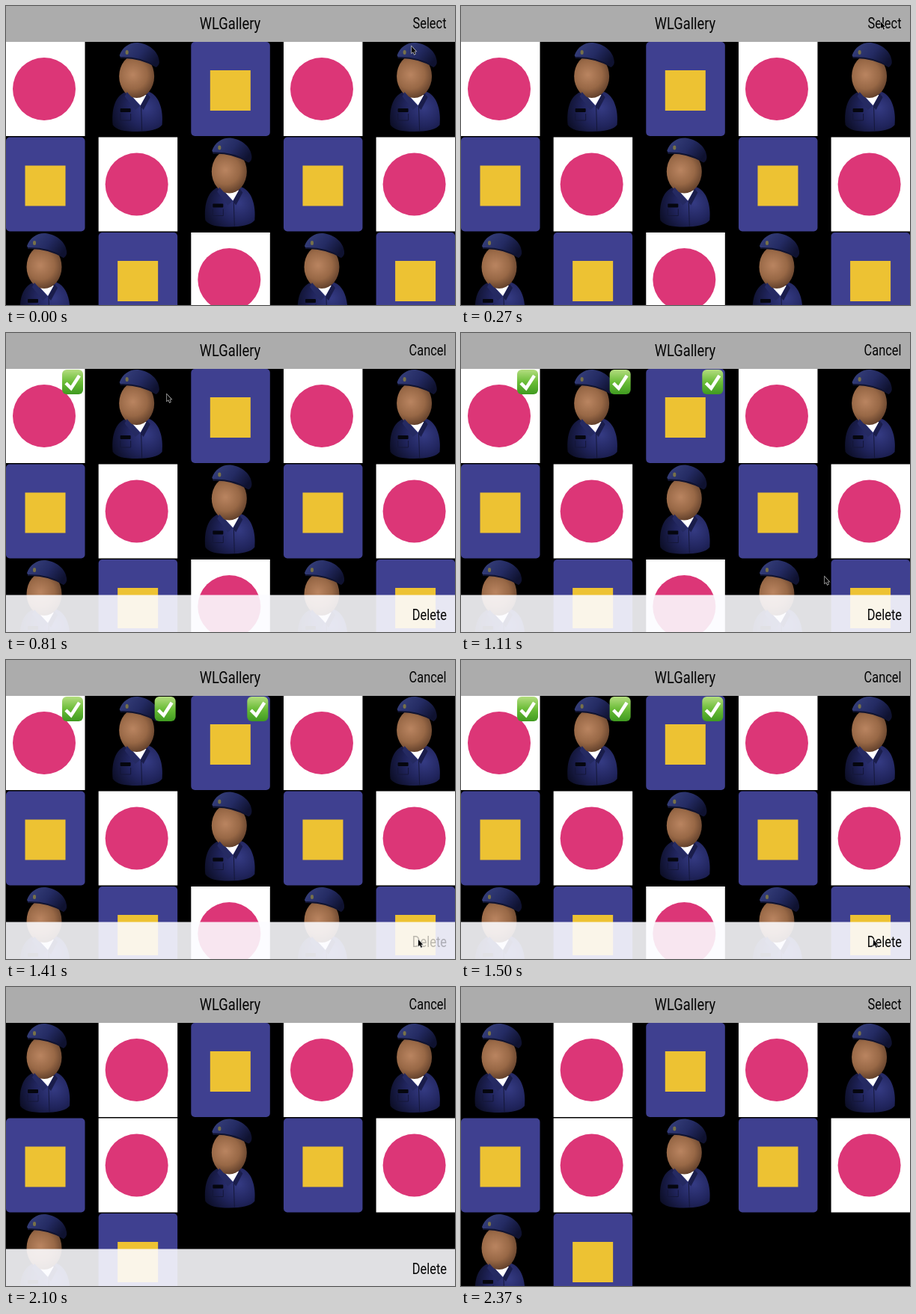
Recreate the animation shown at these times as an HTML page with a canvas. Size 600x400 px, loop 2.4 s.

```html
<!DOCTYPE html>
<html lang="en">
<head>
<meta charset="utf-8">
<title>Gallery</title>
<style>
html, body { margin: 0; width: 100%; height: 100%; overflow: hidden; background: #000; }
canvas { display: block; width: 600px; height: 400px; }
</style>
</head>
<body>
<canvas id="stage" width="600" height="400"></canvas>
<script>
const ctx = document.getElementById('stage').getContext('2d');
const LOOP = 2400, TILE_W = 105.5, TILE_H = 126, COLS = 5;
// The screen has tall pixels: its square tiles appear higher than wide.
const PIXEL_ASPECT = TILE_H / TILE_W;
const KINDS = ['wave', 'officer', 'honey'];

const clamp = v => Math.min(1, Math.max(0, v));
const ease = v => v * v * (3 - 2 * v);
const ramp = (t, from, to) => ease(clamp((t - from) / (to - from)));
const mix = (a, b, p) => a + (b - a) * p;

// time, x, y of the pointer tip
const pointerPath = [
  [0, 542, 54], [210, 561, 21], [450, 561, 21], [660, 85, 96], [720, 85, 96],
  [810, 215, 82], [870, 205, 95], [960, 302, 96], [1000, 302, 96],
  [1110, 486, 326], [1290, 551, 374], [1680, 551, 374]
];

const checkTimes = [690, 870, 980];

function slot(i) {
  return [(i % COLS) * 123.65, 48 + Math.floor(i / COLS) * 127.5];
}

function fillPath(path, color) {
  ctx.fillStyle = color;
  ctx.fill(path instanceof Path2D ? path : new Path2D(path));
}

function box(x, y, w, h, r, color) {
  ctx.beginPath();
  ctx.roundRect(x, y, w, h, r);
  ctx.fillStyle = color;
  ctx.fill();
}

function linear(x0, y0, x1, y1, ...colors) {
  const g = ctx.createLinearGradient(x0, y0, x1, y1);
  colors.forEach((c, i) => g.addColorStop(i / (colors.length - 1), c));
  return g;
}

function radial(x, y, r, ...colors) {
  const g = ctx.createRadialGradient(x, y, 1, x, y, r);
  colors.forEach((c, i) => g.addColorStop(i / (colors.length - 1), c));
  return g;
}

const draw = {
  wave() {
    box(0, 0, TILE_W, TILE_H, 0, '#fff');
    ctx.beginPath();
    ctx.arc(51, 63, 42, 0, Math.PI * 2);
    ctx.fillStyle = '#dc3677';
    ctx.fill();
  },

  honey() {
    box(0, 0, TILE_W, TILE_H, 5, '#3f4090');
    box(25.5, 38, 54, 54, 0, '#edc233');
  },

  officer() {
    fillPath('M19 111C17 88 23 72 36 67Q51 61 68 67C81 72 87 91 85 111C81 117 68 120 51 120S24 118 19 111Z',
      radial(64, 88, 50, '#343a82', '#20245c', '#0c0e26'));
    fillPath('M43 71L64 71L56 85Z', '#fff');
    const head = new Path2D();
    head.ellipse(51, 46, 23.5, 29, 0, 0, Math.PI * 2);
    fillPath(head, radial(46, 44, 37, '#b8835f', '#986846', '#4c3020'));
    fillPath('M38 67L55 86L49 91L35 73Z', '#252a62');
    fillPath('M65 69L56 86L60 91L69 74Z', '#1a1d4b');
    fillPath('M28 18C32 6 43 0 53 1C69 3 80 14 81 25Q82 31 77 34C64 25 46 21 30 22Z',
      linear(35, 4, 72, 32, '#343d78', '#242b63', '#0f1230'));
    ctx.strokeStyle = '#101330';
    ctx.lineWidth = 2;
    ctx.stroke(new Path2D('M29 21Q55 20 77 33'));
    box(36, 11, 4, 6, 2, '#77714a');
    box(29, 89, 14, 5, 1, '#05060e');
    ctx.strokeStyle = '#141739';
    ctx.lineWidth = 1;
    ctx.stroke(new Path2D('M57 87L58 119M29 96V105H43V96'));
  }
};

function tile(kind, x, y, alpha = 1) {
  if (alpha <= 0) return;
  ctx.save();
  ctx.translate(x, y);
  ctx.globalAlpha = alpha;
  draw[kind]();
  ctx.restore();
}

function check(x, y, alpha) {
  ctx.save();
  ctx.translate(x + 75, y + 1);
  ctx.globalAlpha = alpha;
  box(0, 0, 28, 33, 6, linear(0, 0, 0, 33, '#b4dd80', '#6bbd38', '#3f9a20'));
  ctx.strokeStyle = '#fff';
  ctx.lineWidth = 4.5;
  ctx.stroke(new Path2D('M5 18L12 25L23 8'));
  ctx.restore();
}

function label(text, x, y, size, align, alpha = 1) {
  ctx.save();
  ctx.translate(x, y);
  ctx.scale(1, PIXEL_ASPECT);
  ctx.globalAlpha = alpha;
  ctx.font = `${size}px Roboto, sans-serif`;
  ctx.textAlign = align;
  ctx.fillStyle = '#050505';
  ctx.fillText(text, 0, 0);
  ctx.restore();
}

function gallery(t) {
  const shift = ramp(t, 1530, 1680);
  for (let i = 0; i < 15; i++) {
    const [x, y] = slot(i);
    const kind = KINDS[i % 3];
    if (i < 3) {
      tile(kind, x, y, 1 - shift);
      if (t >= checkTimes[i] && shift < 1) check(x, y, 1 - shift);
    } else {
      // the first two remaining tiles settle in swapped order
      const target = i === 3 ? 1 : i === 4 ? 0 : i - 3;
      const [tx, ty] = slot(target);
      tile(kind, mix(x, tx, shift), mix(y, ty, shift));
    }
  }
}

function header(t) {
  box(0, 0, 600, 48, 0, '#acacac');
  label('WLGallery', 299.5, 30.5, 18.3, 'center');
  const select = t < 1200 ? 1 - ramp(t, 270, 400) : ramp(t, 2250, 2340);
  const cancel = ramp(t, 430, 520) * (1 - ramp(t, 2150, 2240));
  label('Select', 588.5, 30, 16.4, 'right', select);
  label('Cancel', 588.5, 30, 16.4, 'right', cancel);
}

function toolbar(t) {
  const shown = ramp(t, 290, 400) * (1 - ramp(t, 2190, 2320));
  if (shown <= 0) return;
  const y = 400 - 49.5 * shown;
  box(0, y, 600, 50, 0, 'rgba(252,252,255,.89)');
  const pressed = t >= 1350 && t < 1500;
  label('Delete', 589, y + 33, 16.4, 'right', pressed ? 0.25 : 1);
}

function pointer(t) {
  const next = pointerPath.findIndex(p => p[0] > t);
  if (next < 1) return;
  const [t0, x0, y0] = pointerPath[next - 1];
  const [t1, x1, y1] = pointerPath[next];
  const p = ramp(t, t0, t1);
  ctx.save();
  ctx.translate(mix(x0, x1, p), mix(y0, y1, p));
  const arrow = new Path2D('M0 0V9L2 7.2L3.6 10.8L5 10L3.5 6.7H6Z');
  ctx.strokeStyle = '#d5d5d5';
  ctx.lineWidth = 1.2;
  ctx.stroke(arrow);
  fillPath(arrow, '#080808');
  ctx.restore();
}

function render(t) {
  ctx.fillStyle = '#000';
  ctx.fillRect(0, 0, 600, 400);
  gallery(t);
  header(t);
  toolbar(t);
  pointer(t);
}

const start = performance.now();
function tick() {
  render((performance.now() - start) % LOOP);
  requestAnimationFrame(tick);
}
tick();
</script>
</body>
</html>
```
